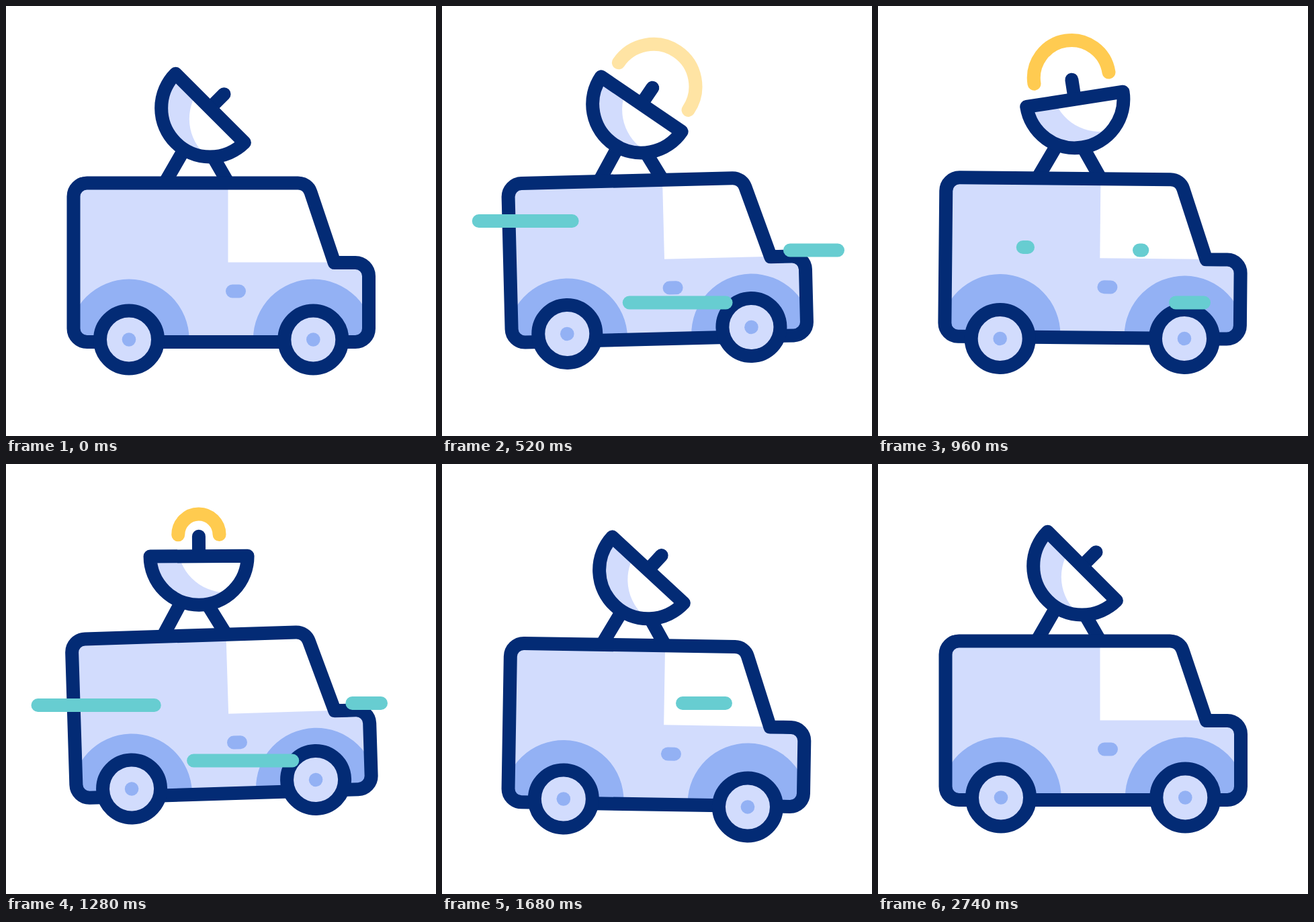
These frames come from a looping animation (640 px wide and 640 px high, 3.02 s). An HTML page:

```html
<!DOCTYPE html>
<html lang="en">
<head>
<meta charset="utf-8">
<title>Broadcast van</title>
<style>
  html, body { margin: 0; width: 100%; height: 100%; overflow: hidden; background: #fff; }
  svg { display: block; width: 100%; height: 100%; }
  .ink { stroke: #032b75; stroke-width: 20; stroke-linejoin: round; }
  .light { fill: #d2dcfd; }
  .mid { fill: #93b1f4; }
  .round { fill: none; stroke-width: 20; stroke-linecap: round; }
</style>
</head>
<body>
<svg viewBox="0 0 640 640" xmlns="http://www.w3.org/2000/svg">
  <defs>
    <path id="shell" d="M120.5 263.5H434.5A20 20 0 0 1 453.5 277.1L488.7 382H520A20 20 0 0 1 540 402V480A20 20 0 0 1 520 500H120.5A20 20 0 0 1 100.5 480V283.5A20 20 0 0 1 120.5 263.5Z"/>
    <path id="bowl" d="M-72.5 0A72.5 72.5 0 0 0 72.5 0Z"/>
    <clipPath id="inShell"><use href="#shell"/></clipPath>
    <clipPath id="inBowl"><use href="#bowl"/></clipPath>
    <g id="wheel">
      <circle r="43" class="ink light"/>
      <circle r="10.3" class="mid"/>
    </g>
  </defs>
  <g id="van">
    <path class="ink" fill="none" d="M236 264L266 212M331 264L301 212"/>
    <g clip-path="url(#inShell)">
      <use href="#shell" class="light"/>
      <path fill="#fff" d="M330.5 260H500V381.5H330.5Z"/>
      <circle class="mid" cx="183" cy="496.3" r="89.7"/>
      <circle class="mid" cx="457.5" cy="496.3" r="89.7"/>
    </g>
    <rect class="mid" x="327" y="414.5" width="30" height="20" rx="10"/>
    <use href="#shell" class="ink" fill="none"/>
    <use href="#wheel" id="rear"/>
    <use href="#wheel" id="front"/>
    <g id="dish">
      <g id="waves"></g>
      <path class="ink" fill="none" stroke-linecap="round" d="M0 0V-29.5"/>
      <g clip-path="url(#inBowl)">
        <use href="#bowl" class="light"/>
        <circle cx="40.4" cy="-17.8" r="72" fill="#fff"/>
      </g>
      <use href="#bowl" class="ink" fill="none"/>
    </g>
  </g>
  <g id="streaks"></g>
</svg>
<script>
const LOOP = 3020;
const $ = id => document.getElementById(id);
const clamp = v => Math.min(1, Math.max(0, v));
const ease = v => { v = clamp(v); return v * v * (3 - 2 * v); };

// Eased value of a list of [time, value] keys
function track(t, keys) {
  let [t0, v0] = keys[0];
  for (const [t1, v1] of keys) {
    if (t < t1) return v0 + (v1 - v0) * ease((t - t0) / (t1 - t0));
    t0 = t1;
    v0 = v1;
  }
  return v0;
}

const times = [0, 520, 740, 960, 1280, 1680, 2000, 2300];
const keys = values => values.map((v, i) => [times[i], v]);
const tilt = keys([0, -1.45, 0.8, 0.54, -1.8, 0.95, 0.5, 0]);
const lift = keys([0, -4.5, 3, -6.3, -9.4, 6.7, 0.2, 0]);
const rearHop = keys([0, -7.5, 3, 6.1, -7.9, -2.4, 6.5, 0]);
const frontHop = keys([0, -10.5, 5, 3.5, -12.8, 5, 3.1, 0]);
const aim = [[0, 45], [380, 45], [920, -10], [1200, 1.5], [1330, 1.5], [1785, 48], [2300, 45]];

const waveStarts = [-5, 490, 1024];
const WAVE_TIME = 587;

// Speed lines run from right to left: the head leads, the tail follows
const streaks = [
  { y: 320, x: 254, len: 200, start: 58, trail: 310 },
  { y: 441.5, x: 485, len: 207, start: 58, trail: 310 },
  { y: 363.5, x: 589, len: 200, start: 328, trail: 310 },
  { y: 441.5, x: 485, len: 207, start: 822, trail: 310 },
  { y: 359, x: 223, len: 200, start: 906, trail: 400 },
  { y: 356, x: 558, len: 200, start: 1138, trail: 310 }
];

function addPath(parent, color) {
  const p = document.createElementNS("http://www.w3.org/2000/svg", "path");
  p.setAttribute("class", "round");
  p.setAttribute("stroke", color);
  return parent.appendChild(p);
}
const wavePaths = waveStarts.map(() => addPath($("waves"), "#ffcb4f"));
const streakPaths = streaks.map(() => addPath($("streaks"), "#67cdd1"));

const move = (id, value) => $(id).setAttribute("transform", value);

function draw(t) {
  move("van", `translate(0 ${track(t, lift)}) rotate(${track(t, tilt)} 320 361)`);
  move("rear", `translate(183 ${496.5 + track(t, rearHop)})`);
  move("front", `translate(457.3 ${496.5 + track(t, frontHop)})`);
  move("dish", `rotate(${track(t, aim)} 290.8 161.2) translate(293.4 145.6)`);

  waveStarts.forEach((start, i) => {
    const u = clamp((t - start) / WAVE_TIME);
    const r = 70 * u;
    wavePaths[i].setAttribute("d", `M${-r} -32A${r} ${r} 0 0 1 ${r} -32`);
    wavePaths[i].setAttribute("opacity", Math.min(clamp((u - 0.055) / 0.14), clamp((1 - u) / 0.2)));
  });

  streaks.forEach((s, i) => {
    const age = t - s.start;
    const head = ease(age / 480);
    const tail = ease((age - 350) / s.trail);
    const shown = age > 0 && tail < 1;
    streakPaths[i].setAttribute("d", shown ? `M${s.x - s.len * tail} ${s.y}H${s.x - s.len * head}` : "");
  });
}

const begin = performance.now();
function tick() {
  draw((performance.now() - begin) % LOOP);
  requestAnimationFrame(tick);
}
tick();
</script>
</body>
</html>
```
